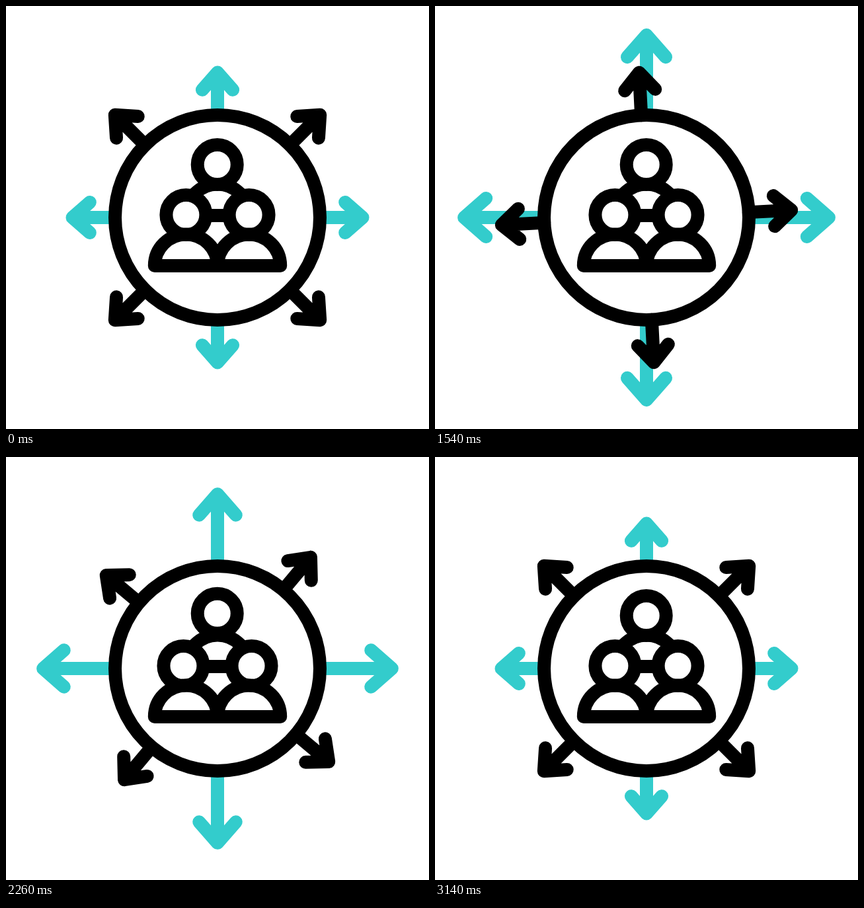
An HTML page with a canvas that plays this animation: 640 px wide and 640 px high, repeating every 3400 ms.

```html
<!DOCTYPE html>
<html lang="en">
<head>
<meta charset="utf-8">
<title>Team reach</title>
<style>
  html, body { margin: 0; width: 100%; height: 100%; overflow: hidden; background: #fff; }
  canvas { display: block; width: 640px; height: 640px; }
</style>
</head>
<body>
<canvas id="stage" width="640" height="640"></canvas>
<script>
const ctx = document.getElementById('stage').getContext('2d');
const LOOP = 3400, TEAL = '#33cccc', BLACK = '#000';
const C = 320, RING = 155, TIP = 219.5, BACK = 26.3, SIDE = 23.1;

// Eased value through [time, value] keys
function track(keys, t) {
  if (t <= keys[0][0]) return keys[0][1];
  for (let i = 1; i < keys.length; i++) {
    const [t0, v0] = keys[i - 1], [t1, v1] = keys[i];
    if (t < t1) {
      const u = (t - t0) / (t1 - t0);
      return v0 + (v1 - v0) * u * u * (3 - 2 * u);
    }
  }
  return keys[keys.length - 1][1];
}

const REACH = [[0, 0], [200, 1], [600, 1], [800, 0]];
const PULSE = [[1200, 0], [1600, 1], [2000, 0.066], [2400, 1], [2800, 0]];
const TURN = [[1200, 0], [2800, 360]];
const SPREAD = [[1600, 0], [2000, 1], [2400, 0], [2800, 1], [3140, 0]];

// Arrow pointing outwards, angle in degrees clockwise from up
function arrow(angle, scale, color) {
  const tip = -TIP * scale, wing = tip + BACK * scale, side = SIDE * scale;
  ctx.save();
  ctx.translate(C, C);
  ctx.rotate(angle * Math.PI / 180);
  ctx.strokeStyle = color;
  ctx.beginPath();
  ctx.moveTo(0, -RING);
  ctx.lineTo(0, tip);
  ctx.moveTo(-side, wing);
  ctx.lineTo(0, tip);
  ctx.lineTo(side, wing);
  ctx.stroke();
  ctx.restore();
}

function circle(x, y, r) {
  ctx.beginPath();
  ctx.arc(x, y, r, 0, Math.PI * 2);
}

function head(x, y) {
  circle(x, y, 30);
  ctx.fill();
  ctx.stroke();
}

function body(x, y) {
  ctx.beginPath();
  ctx.arc(x, y, 47.6, Math.PI, 0);
  ctx.closePath();
  ctx.stroke();
}

function people(p) {
  const dx = 47.6 + 14.2 * p;
  body(C, 317);
  head(C - 0.3, 240 - 11.7 * p);
  head(C - dx, 316);
  head(C + dx, 316);
  body(C - 47.6, 393);
  body(C + 47.6, 393);
}

function draw(t) {
  ctx.fillStyle = '#fff';
  ctx.fillRect(0, 0, 640, 640);
  ctx.lineWidth = 20;
  ctx.lineCap = ctx.lineJoin = 'round';

  const pulse = 1 + 0.273 * track(PULSE, t);
  const turn = track(TURN, t);
  for (let i = 0; i < 4; i++) arrow(i * 90, pulse, TEAL);
  for (let i = 0; i < 4; i++) {
    arrow(45 + i * 90 + turn, 1 + 0.478 * track(REACH, t - i * 200), BLACK);
  }

  ctx.strokeStyle = BLACK;
  circle(C, C, RING);
  ctx.stroke();
  people(track(SPREAD, t));
}

const start = performance.now();
function tick() {
  draw((performance.now() - start) % LOOP);
  requestAnimationFrame(tick);
}
tick();
</script>
</body>
</html>
```
